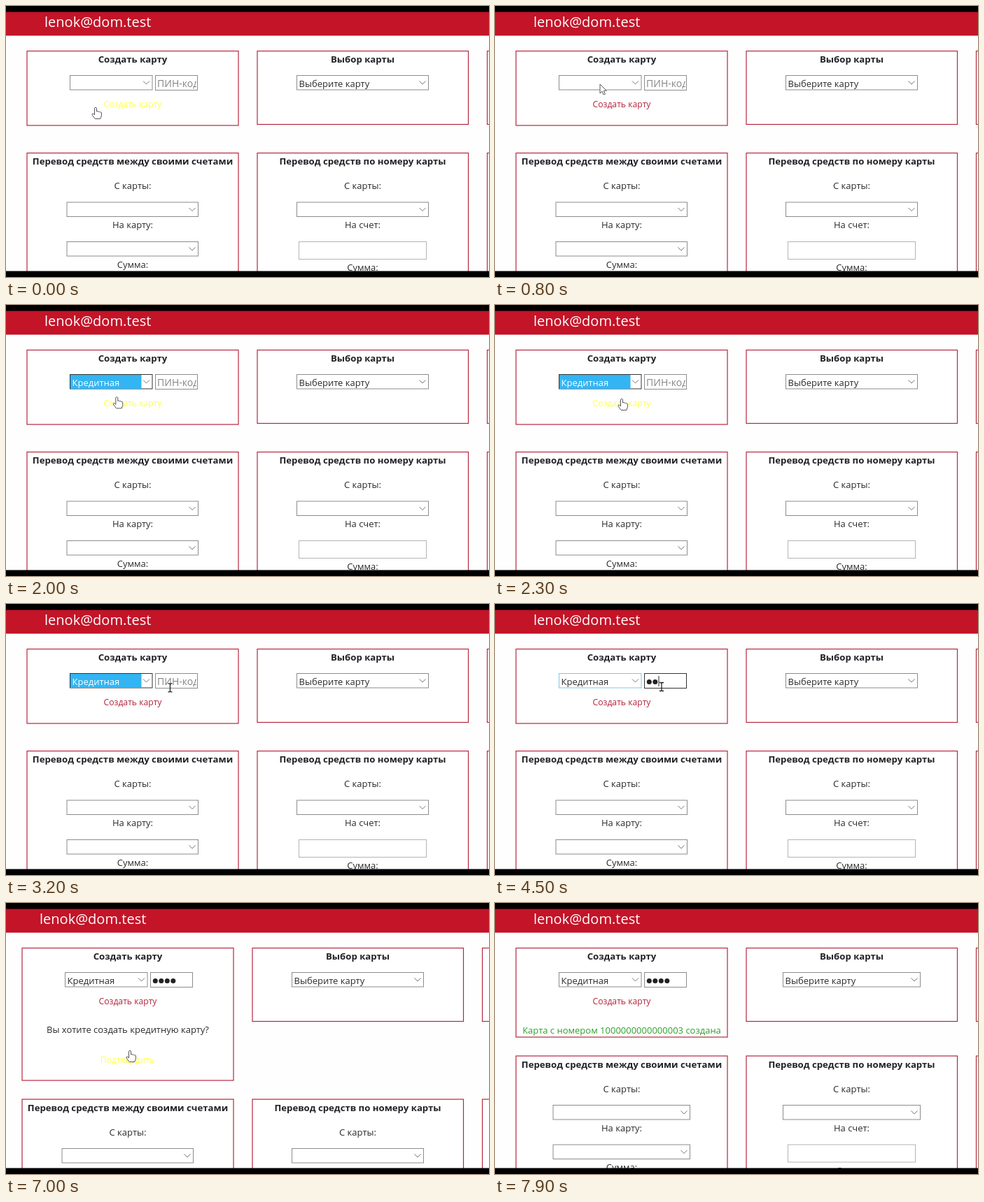
An HTML page that plays this animation: 690x388 px, repeating every 8 s.

```html
<!DOCTYPE html>
<html lang="ru">
<head>
<meta charset="utf-8">
<title>Карты</title>
<style>
  html, body { margin: 0; width: 100%; height: 100%; overflow: hidden; background: #fff; }
  #stage { display: block; width: 690px; height: 388px; }
  text { font: 13px "Open Sans", "Noto Sans", sans-serif; fill: #2b2b2e; white-space: pre; }
  .mid { text-anchor: middle; }
  .title { font-weight: 700; font-size: 13.2px; fill: #202226; }
  .link { font-size: 12.2px; fill: #b3243c; }
  .link.hover { fill: #ffff4d; }
  .mail { font-size: 20px; fill: #fff; }
  .done { fill: #2c9f2c; }
  .hint { font-size: 14px; fill: #85858a; }
  .picked { fill: #fff; }
  .card { fill: #fff; stroke: #b5273f; stroke-width: 1.2; }
  .field { fill: #fff; stroke: #8c8c8c; }
  .field.pale { stroke: #b4b4b4; }
  .field.dark { stroke: #333; }
  .field.blue { stroke: #7cc8e6; }
  .chev { fill: none; stroke: #777; }
  .pointer { fill: #fff; stroke: #55555c; stroke-linejoin: round; }
  .beam { fill: none; stroke: #222; stroke-width: 1.3; }
</style>
</head>
<body>
<svg id="stage" viewBox="0 0 690 388"></svg>
<script>
const LOOP = 8000, STEP = 100;
const OPEN = 1000, PICK = 1700, BLUR = 3700, LEAVE = 6100, ASK = 6500, DONE = 7500;
const KEYS = [4300, 4500, 4600, 4800];
const BLUE = '#33b5f3';

// time, x, y of the pointer's hot spot
const PATH = [
  [0, 128, 145], [300, 128, 145], [800, 150, 112], [1100, 150, 112],
  [1300, 149, 122], [1500, 146, 130], [1800, 146, 130], [2300, 181, 134],
  [2700, 190, 136], [3300, 238, 118], [5200, 238, 118], [5600, 222, 133],
  [6200, 213, 132], [6500, 212, 132], [6900, 177, 211], [7500, 177, 211],
  [7800, 188, 400], [LOOP, 188, 400]
];

const POINTERS = {
  arrow: '<path class="pointer" d="M0 0V13L3 10.2L5.2 15L7.4 14L5.3 9.3H9.3Z"/>',
  hand: '<path class="pointer" d="M-1.5 9V1.2Q0 -.8 1.5 1.2V6Q3 4.8 4.2 6.4Q5.6 5.5 6.6 7Q8 6.4 8.4 8V12L6.8 16.5H-.8L-5.2 10.5Q-4.6 8.2 -2.8 9.4L-1.5 11Z"/>',
  beam: '<path class="beam" d="M-3 -5.5H-1L0 -4.5L1 -5.5H3M0 -4.5V5.5M-3 6.5H-1L0 5.5L1 6.5H3"/>'
};

const inside = (p, x0, y0, x1, y1) => p.x >= x0 && p.x <= x1 && p.y >= y0 && p.y <= y1;
const text = (x, y, s, cls = '') => `<text x="${x}" y="${y}" class="${cls}">${s}</text>`;
const mid = (x, y, s, cls = '') => text(x, y, s, 'mid ' + cls);
const box = (x, y, w, h, fill) => `<rect x="${x}" y="${y}" width="${w}" height="${h}" fill="${fill}"/>`;
const frame = (x, y, w, h, cls) => `<rect x="${x}" y="${y}" width="${w}" height="${h}" class="${cls}"/>`;
const group = (x, y, s) => `<g transform="translate(${x} ${y})">${s}</g>`;
const clip = (x, y, w, h, s) => `<svg x="${x}" y="${y}" width="${w}" height="${h}" viewBox="${x} ${y} ${w} ${h}">${s}</svg>`;
const chevron = (x, y, up = 1) => `<path class="chev" d="M${x - 4.5} ${y - 2 * up}l4.5 ${4.5 * up}l4.5 ${-4.5 * up}"/>`;

function select(x, y, w, label = '', cls = '') {
  return frame(x, y, w, 20.5, 'field ' + cls) + text(x + 3, y + 16, label) + chevron(x + w - 8.5, y + 10);
}

function pointerAt(t) {
  const i = PATH.findIndex(k => k[0] > t);
  const [t0, x0, y0] = PATH[i - 1], [t1, x1, y1] = PATH[i];
  const u = (t - t0) / (t1 - t0), e = u * u * (3 - 2 * u);
  return { x: x0 + (x1 - x0) * e, y: y0 + (y1 - y0) * e };
}

function pinField(t) {
  const typed = KEYS.filter(k => t >= k).length;
  const focus = t >= BLUR && t < LEAVE;
  let s = frame(213.5, 99.5, 60, 21, 'field ' + (focus ? 'dark' : ''));
  if (t < BLUR) s += clip(214, 100, 58, 20, text(216, 116, 'ПИН-код', 'hint'));
  for (let i = 0; i < typed; i++) s += `<circle cx="${220.3 + 8.5 * i}" cy="111.5" r="3.5" fill="#222"/>`;
  if (focus && t < 5200) s += box(216.5 + 8.5 * typed, 103, 1, 15, '#222');
  return s;
}

function typeSelect(t) {
  if (t < PICK) return select(91.5, 99.5, 117.5);
  const held = t < BLUR;
  let s = select(91.5, 99.5, 117.5, 'Кредитная', held ? 'dark' : t < ASK ? 'blue' : '');
  if (held) s += box(92, 100, 101.5, 20, BLUE) + text(94.5, 115.5, 'Кредитная', 'picked');
  return s;
}

function popup(t) {
  const row = t < 1500 ? 0 : 1;
  const items = ['Кредитная', 'Для выплат', 'Накопительная'];
  return box(91, 99, 119.5, 75, '#222') + box(92.5, 100.5, 116.5, 72, '#fff') +
    box(93, 102 + 19 * row, 101, 17.5, BLUE) +
    clip(93, 101, 101, 71, items.map((s, i) =>
      text(94.5, 134.5 + 19 * i, s, row === i + 1 ? 'picked' : '')).join('')) +
    box(194, 100.5, 15, 72, '#f0f0f0') + box(194, 116, 14.5, 37.5, '#cdcdcd') +
    chevron(201, 108, -1) + chevron(201, 164);
}

function lowerRow(wide) {
  const g = wide ? 4 : 0;
  return frame(30, 210.5, 302, 240, 'card') + frame(359, 210.5, 301.5, 240, 'card') +
    frame(687.5, 210.5, 302, 240, 'card') +
    mid(181, 227, 'Перевод средств между своими счетами', 'title') +
    mid(509.5, 227, 'Перевод средств по номеру карты', 'title') +
    mid(181, 262, 'С карты:') + mid(509.5, 262, 'С карты:') +
    select(87 - g, 281, 187.5 + 2 * g) + select(415.5 - g, 281, 188 + 2 * g) +
    mid(181, 318, 'На карту:') + mid(509.5, 318, 'На счет:') +
    select(87 - g, 337.5, 187.5 + 2 * g) + frame(418.5, 337.5, 182, 25, 'field pale') +
    mid(181, 374.5, 'Сумма:') + mid(509.5, 379, 'Сумма:');
}

function scene(t) {
  const p = pointerAt(t);
  const asking = t >= ASK && t < DONE, done = t >= DONE;
  const listed = t >= OPEN && t < PICK;
  const onLink = !listed && inside(p, 115, 130, 245, 152);
  const onConfirm = asking && inside(p, 125, 208, 220, 235);
  const onPin = !listed && inside(p, 213, 99, 274, 121);
  const bottom = asking ? 254 : done ? 192 : 171;
  const drop = asking ? 70.5 : done ? 8.5 : 0;
  const g = done ? 4 : 0;

  let page = text(55, 30, 'lenok@dom.test', 'mail') +
    frame(30, 64.5, 302, bottom - 64.5, 'card') + frame(359, 64.5, 301.5, 105, 'card') +
    frame(687.5, 64.5, 302, 105, 'card') +
    mid(181, 80.5, 'Создать карту', 'title') + mid(509.5, 80.5, 'Выбор карты', 'title') +
    typeSelect(t) + pinField(t) +
    select(415.5 - g, 99.5, 188 + 2 * g, 'Выберите карту') +
    mid(181, 145, 'Создать карту', onLink ? 'link hover' : 'link');
  if (asking) {
    page += mid(181, 186, 'Вы хотите создать кредитную карту?') +
      mid(180.5, 228.5, 'Подтвердить', onConfirm ? 'link hover' : 'link');
  }
  if (done) page += mid(181, 187, 'Карта с номером 1000000000000003 создана', 'done');
  page += group(0, drop, lowerRow(done));
  if (listed) page += popup(t);

  const kind = onLink || onConfirm ? 'hand' : onPin ? 'beam' : 'arrow';
  return box(0, 0, 690, 388, '#fffefe') + box(0, 8, 690, 34.5, '#c31428') +
    group(asking ? -7 : 0, 0, page) + group(p.x, p.y, POINTERS[kind]) +
    box(0, 0, 690, 8.5, '#000') + box(0, 379.5, 690, 8.5, '#000');
}

const stage = document.getElementById('stage');
let shown = -1;
function tick() {
  const t = Math.floor(performance.now() % LOOP / STEP) * STEP;
  if (t !== shown) stage.innerHTML = scene(shown = t);
  requestAnimationFrame(tick);
}
tick();
</script>
</body>
</html>
```
